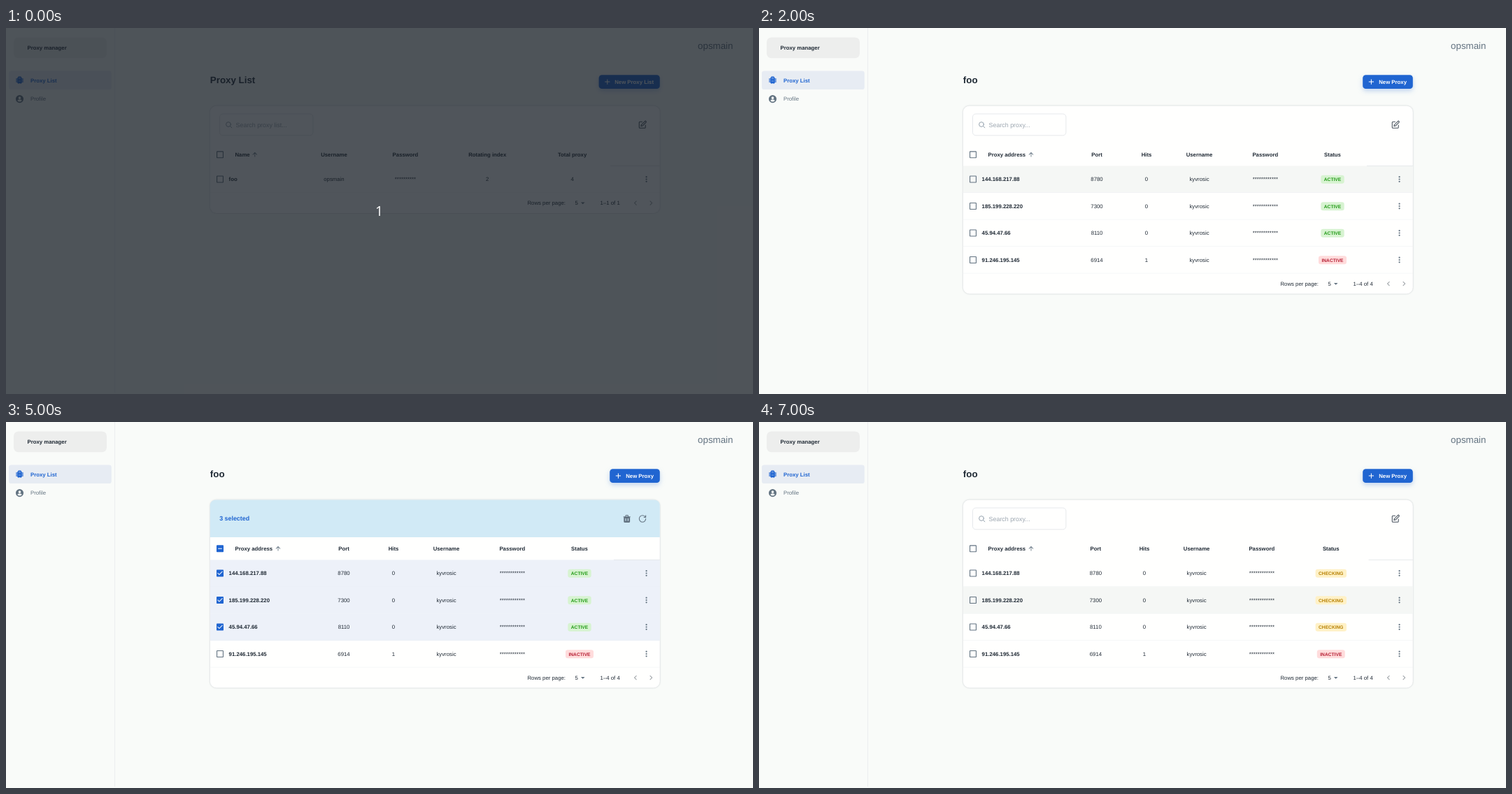
Recreate the animation shown at these times as an HTML page. Size 1068x524 px, loop 8000 ms.

```html
<!DOCTYPE html>
<html lang="en">
<head>
<meta charset="utf-8">
<title>Proxy manager</title>
<style>
html, body { margin: 0; width: 100%; height: 100%; overflow: hidden; background: #f9fbf9; }
svg { display: block; width: 1068px; height: 524px; }
text { font: 7.79px "Liberation Sans", Arial, sans-serif; fill: #212b36; text-rendering: geometricPrecision; }
.card { filter: drop-shadow(0 .6px .9px rgba(100,112,125,.36)); }
.button { filter: drop-shadow(0 3px 3.5px rgba(32,101,209,.26)); }
</style>
</head>
<body>
<svg id="stage" viewBox="0 0 1068 524"></svg>
<script>
const INK = '#212b36', GREY = '#637381', BLUE = '#2065d1', PALE = '#919eab';
const ROW_TOP = 197.4, ROW_H = 38.5, LEFT = 291.8, RIGHT = 934.8;

const BOX = 'M19 3H5c-1.1 0-2 .9-2 2v14c0 1.1.9 2 2 2h14c1.1 0 2-.9 2-2V5c0-1.1-.9-2-2-2z';
const ICONS = {
  blank: 'M19 5v14H5V5h14m0-2H5c-1.1 0-2 .9-2 2v14c0 1.1.9 2 2 2h14c1.1 0 2-.9 2-2V5c0-1.1-.9-2-2-2z',
  some: BOX + 'M17 13H7v-2h10z',
  checked: BOX + 'M10 17l-5-5 1.41-1.41L10 14.17l7.59-7.59L19 8z',
  up: 'M4 12l1.41 1.41L11 7.83V20h2V7.83l5.58 5.59L20 12l-8-8z',
  more: 'M12 4a2 2 0 1 1 0 4 2 2 0 0 1 0-4zm0 6a2 2 0 1 1 0 4 2 2 0 0 1 0-4zm0 6a2 2 0 1 1 0 4 2 2 0 0 1 0-4z',
  caret: 'M7 10l5 5 5-5z',
  prev: 'M15.41 7.41L14 6l-6 6 6 6 1.41-1.41L10.83 12z',
  next: 'M8.59 16.59L13.17 12 8.59 7.41 10 6l6 6-6 6z',
  plus: 'M19 13h-6v6h-2v-6H5v-2h6V5h2v6h6z',
  user: 'M12 2a10 10 0 1 0 0 20 10 10 0 0 0 0-20zm0 4a3.3 3.3 0 1 1 0 6.6A3.3 3.3 0 0 1 12 6zm0 13a7 7 0 0 1-5.6-2.8c.1-1.6 3.6-2.5 5.6-2.5s5.5.9 5.6 2.5A7 7 0 0 1 12 19z',
  proxy: 'M3 7h2v11H3zM19 7h2v11h-2zM8 5V4q0-2 2-2h4q2 0 2 2v1q2 0 2 2v11q0 2-2 2v1h-2v-1h-4v1H8v-1q-2 0-2-2V7q0-2 2-2zm2-1v1h4V4zM9 8v1h6V8zM9 14v1h6v-1z',
  trash: 'M21 6h-5V4.3A2.4 2.4 0 0 0 13.5 2h-3A2.4 2.4 0 0 0 8 4.3V6H3v2h1v11a3 3 0 0 0 3 3h10a3 3 0 0 0 3-3V8h1zM10 6V4.3l.5-.3h3l.5.3V6zM8 11v7h2v-7zM14 11v7h2v-7z'
};
const LINES = {
  search: 'M18 11a7 7 0 1 1-14 0 7 7 0 0 1 14 0zM16 16l5 5',
  edit: 'M11 4H5a2 2 0 0 0-2 2v13a2 2 0 0 0 2 2h13a2 2 0 0 0 2-2v-6M18.5 2.5a2.1 2.1 0 0 1 3 3L12 15l-4 1 1-4z',
  reload: 'M21 12a9 9 0 1 1-9-9c2.5 0 4.9 1 6.7 2.7L21 8M21 3v5h-5'
};
const BADGES = {
  ACTIVE: [33.4, '#d7f3d1', '#229a16'],
  INACTIVE: [40, '#ffdcdc', '#b72136'],
  CHECKING: [44.4, '#fff1c6', '#b78103']
};

const text = (s, x, y, { size = 7.79, bold, fill = INK, anchor = 'start' } = {}) =>
  `<text x="${x}" y="${y}" text-anchor="${anchor}" style="font-size:${size}px;font-weight:${bold ? 700 : 400};fill:${fill}">${s}</text>`;
const mid = (s, x, y, bold) => text(s, x, y, { bold, anchor: 'middle' });
const rect = (x, y, w, h, fill, r = 0, extra = '') =>
  `<rect x="${x}" y="${y}" width="${w}" height="${h}" rx="${r}" fill="${fill}" ${extra}/>`;
const circle = (x, y, r, fill) => `<circle cx="${x}" cy="${y}" r="${r}" fill="${fill}"/>`;
const icon = (name, x, y, color = GREY, size = 13.35) => {
  const paint = ICONS[name] ? `fill="${color}" fill-rule="evenodd"`
    : `fill="none" stroke="${color}" stroke-width="2" stroke-linecap="round" stroke-linejoin="round"`;
  return `<path transform="translate(${x} ${y}) scale(${size / 24}) translate(-12 -12)" d="${ICONS[name] || LINES[name]}" ${paint}/>`;
};

function badge(label, x, y) {
  const [w, fill, ink] = BADGES[label];
  return rect(x - w / 2, y - 5.7, w, 12, fill, 3.3) +
    text(label, x, y + 2.8, { size: 6.67, bold: true, fill: ink, anchor: 'middle' });
}

function frame() {
  return rect(0, 0, 1068, 524, '#f9fbf9') + rect(155.2, 0, .6, 522, '#e3e7e9') +
    rect(11, 13.4, 133, 29.8, '#edeeed', 6.7) + text('Proxy manager', 30.5, 31.2, { bold: true }) +
    rect(4, 61.4, 146.8, 26.7, '#e7ecf3', 3.4) + icon('proxy', 19.5, 74.7, BLUE) +
    text('Proxy List', 35, 77.5, { bold: true, fill: BLUE }) +
    icon('user', 19.5, 101.6) + text('Profile', 35, 104.3, { fill: GREY }) +
    text('opsmain', 1039.5, 30.4, { size: 13.35, fill: GREY, anchor: 'end' });
}

function heading(title, label, x) {
  return text(title, 291.8, 79.2, { size: 13.35, bold: true }) +
    rect(x, 67.2, RIGHT - x, 19.9, BLUE, 4.4, 'class="button"') +
    icon('plus', x + 12.2, 77.1, '#fff', 12.4) +
    text(label, 926, 79.8, { bold: true, fill: '#fff', anchor: 'end' });
}

function toolbar({ picked, search, edit }) {
  if (picked) {
    return `<path d="M${LEFT} 165V120.4q0-8.9 8.9-8.9H925.9q8.9 0 8.9 8.9V165z" fill="#d1eaf6"/>` +
      text(picked + ' selected', 305.2, 141.4, { size: 8.9, bold: true, fill: BLUE }) +
      icon('trash', 887.7, 138.5) + icon('reload', 910, 138.5, GREY, 12.4);
  }
  return rect(305.5, 123, 133.4, 30.8, 'none', 4.4, 'stroke="#dce0e4" stroke-width=".7"') +
    icon('search', 318.5, 138.5, PALE, 11.6) + text(search, 328.6, 141.7, { size: 8.9, fill: '#9ba5af' }) +
    (edit ? circle(910, 138.5, 11.1, '#eef0f1') : '') + icon('edit', 910, 138.5, '#454f5b', 12.6) +
    (edit ? rect(899.8, 157.4, 20.8, 13.8, GREY, 3.3) +
      text('Edit', 910.2, 166.5, { size: 6.1, bold: true, fill: '#fff', anchor: 'middle' }) : '');
}

function table({ heads, cols, rows, picked = 0, hover, halo, arrow, lineX }) {
  let out = icon(picked ? 'some' : 'blank', 306, 181.3, picked ? BLUE : GREY) +
    text(heads[0], 327.5, 184, { bold: true }) + icon('up', arrow, 181.2, GREY, 10) +
    cols.map((x, i) => mid(heads[i + 1], x, 184, true)).join('');
  rows.forEach((cells, i) => {
    const top = ROW_TOP + i * ROW_H, y = top + 19.1, on = i < picked;
    const fill = on ? '#edf1f9' : i === hover ? '#f5f7f5' : 'none';
    out += rect(LEFT, top, RIGHT - LEFT, ROW_H, fill) +
      rect(LEFT, top + ROW_H - .6, RIGHT - LEFT, .6, on ? '#eaeef5' : '#f0f2f3') +
      (i === halo ? circle(306, y, 11.7, '#e9ecec') : '') +
      icon(on ? 'checked' : 'blank', 306, y, on ? BLUE : GREY) +
      text(cells[0], 318.6, y + 2.8, { bold: true }) +
      cols.map((x, j) => {
        const cell = cells[j + 1];
        return BADGES[cell] ? badge(cell, x, y) : mid(cell, x, y + 2.8);
      }).join('') + icon('more', 915.6, y);
  });
  return out + rect(lineX, 196.9, RIGHT - lineX, .7, '#dde1e4');
}

function pager(count, y) {
  return text('Rows per page:', 745.5, y + 2.8) + text('5', 813.6, y + 2.4) +
    icon('caret', 824.7, y, GREY) + text(`1–${count} of ${count}`, 849.6, y + 2.8) +
    icon('prev', 900, y, '#a3a8ab') + icon('next', 922.2, y, '#a3a8ab');
}

function page(view) {
  const bottom = ROW_TOP + view.rows.length * ROW_H;
  return frame() + heading(view.title, view.button, view.buttonX) +
    rect(LEFT, 111.5, RIGHT - LEFT, bottom + 29 - 111.5, '#fffffe', 8.9, 'class="card"') +
    toolbar(view) + table(view) + pager(view.rows.length, bottom + 14.7);
}

const lists = (opts) => page({
  title: 'Proxy List', button: 'New Proxy List', buttonX: 847.6, search: 'Search proxy list...',
  heads: ['Name', 'Username', 'Password', 'Rotating index', 'Total proxy'],
  cols: [469, 571, 688.2, 809.6], arrow: 355.8, lineX: 864,
  rows: [['foo', 'opsmain', '*'.repeat(10), 2, 4]], ...opts
});

const HOSTS = [['144.168.217.88', 8780, 0], ['185.199.228.220', 7300, 0],
  ['45.94.47.66', 8110, 0], ['91.246.195.145', 6914, 1]];
const proxies = (status, cols, lineX, opts) => page({
  title: 'foo', button: 'New Proxy', buttonX: 863.2, search: 'Search proxy...',
  heads: ['Proxy address', 'Port', 'Hits', 'Username', 'Password', 'Status'],
  cols, arrow: 389, lineX,
  rows: HOSTS.map((h, i) => [...h, 'kyvrosic', '*'.repeat(12), i < 3 ? status : 'INACTIVE']), ...opts
});
const active = opts => proxies('ACTIVE', [483, 554, 629.5, 723.8, 820], 869, opts);
const checking = opts => proxies('CHECKING', [481.4, 551, 625.6, 718.8, 817.8], 871.5, opts);

const countdown = lists() + rect(0, 0, 1068, 524, 'rgba(22,28,36,.75)') +
  '<text x="533.6" y="268.6" text-anchor="middle" style="font:19.5px \'Open Sans\',sans-serif;fill:#fff">1</text>';

// One scene per second
const scenes = [
  countdown,
  lists({ hover: 0 }),
  active({ hover: 0 }),
  active({ picked: 1, hover: 1 }),
  active({ picked: 2, hover: 2, halo: 2 }),
  active({ picked: 3 }),
  checking({ edit: true }),
  checking({ hover: 1 })
];

const stage = document.getElementById('stage');
const start = performance.now();
let shown = -1;
function draw() {
  const now = Math.floor((performance.now() - start) / 1000) % scenes.length;
  if (now !== shown) stage.innerHTML = scenes[shown = now];
  requestAnimationFrame(draw);
}
draw();
</script>
</body>
</html>
```
